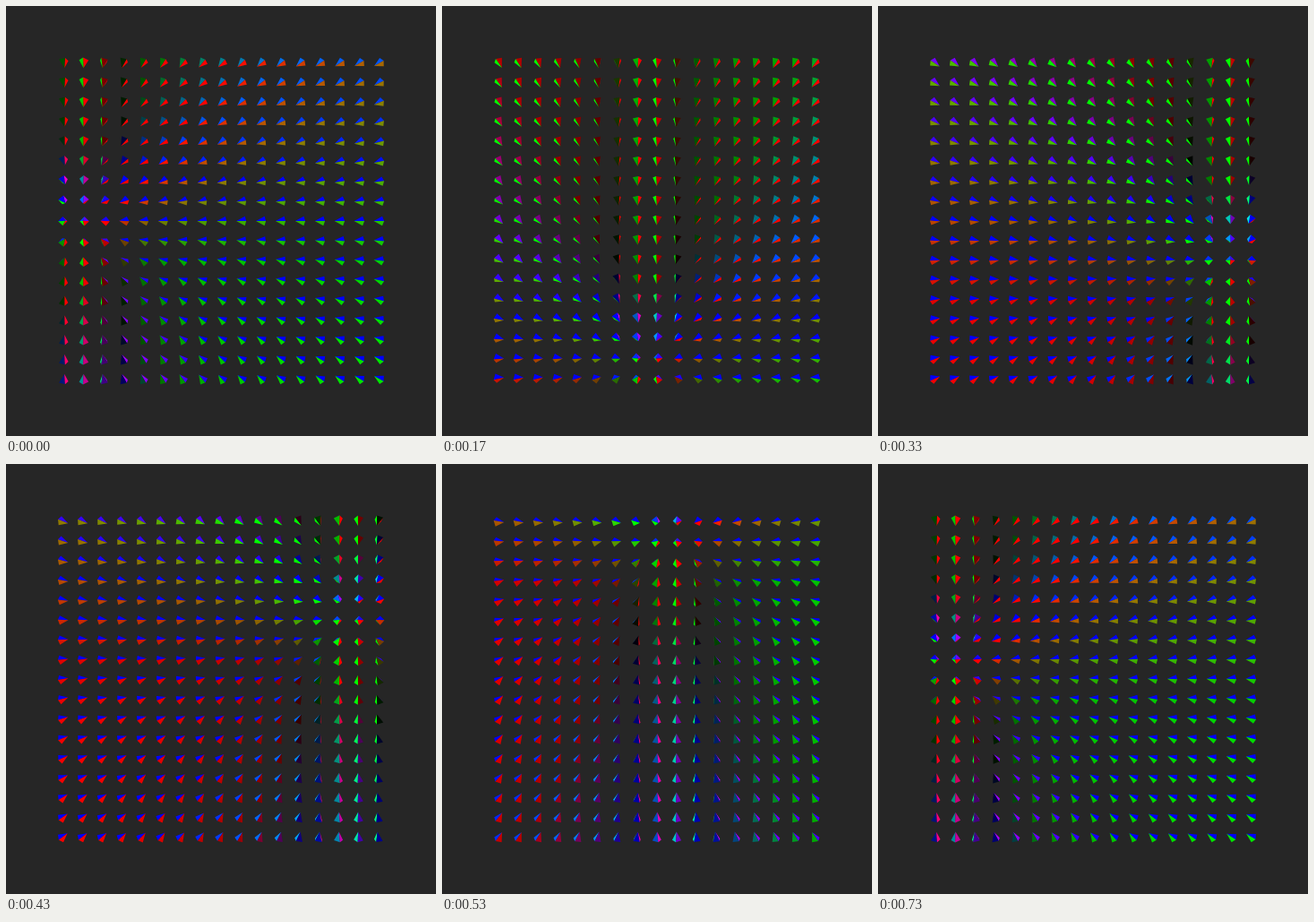
These frames come from a looping animation (480x480 px, 0.76 s). An HTML page with a canvas:

```html
<!DOCTYPE html>
<html>
<head>
<meta charset="utf-8">
<style>
html, body { margin: 0; width: 100%; height: 100%; overflow: hidden; background: #262626; }
canvas { display: block; }
</style>
</head>
<body>
<canvas id="stage" width="480" height="480"></canvas>
<script>
const ctx = document.getElementById('stage').getContext('2d');
const LOOP = 760, STEPS = 23;
const COUNT = 17, GAP = 21.9;
const RADIUS = 5.2, HALF = 5;
const CAMERA = 600;
const ORBIT = { radius: 150, y: 2, z: 40 };

// Orbit angle in degrees, counter-clockwise, by step.
const KEYS = [[0, 180], [5, 266], [10, 344], [13, 385], [16, 445], [19, 489], [22, 534]];

// Coloured lights in the picture plane: angle and strength for r, g, b.
const LIGHTS = [[-30, 1.45], [210, 1.35], [90, 3]].map(([deg, power]) => {
  const a = deg * Math.PI / 180;
  return [Math.cos(a) * power, Math.sin(a) * power, 0];
});

const add = (a, b, k = 1) => a.map((v, i) => v + b[i] * k);
const dot = (a, b) => a[0] * b[0] + a[1] * b[1] + a[2] * b[2];
const cross = (a, b) => [
  a[1] * b[2] - a[2] * b[1],
  a[2] * b[0] - a[0] * b[2],
  a[0] * b[1] - a[1] * b[0]
];
const unit = a => {
  const len = Math.hypot(...a) || 1;
  return a.map(v => v / len);
};

function project([x, y, z]) {
  const k = CAMERA / (CAMERA - z);
  return [240 + x * k, 240 - y * k];
}

function drawFace(points) {
  const normal = unit(cross(add(points[1], points[0], -1), add(points[2], points[0], -1)));
  if (dot(normal, add([0, 0, CAMERA], points[0], -1)) <= 0) return;
  const rgb = LIGHTS.map(light => Math.round(255 * Math.min(1, Math.max(0, dot(normal, light)))));
  ctx.fillStyle = `rgb(${rgb})`;
  ctx.beginPath();
  points.forEach(p => ctx.lineTo(...project(p)));
  ctx.fill();
}

function drawPyramid(center, target) {
  const ahead = unit(add(target, center, -1));
  const side = unit(cross([0, 1, 0], ahead));
  const up = cross(ahead, side);
  const tip = add(center, ahead, HALF);
  const back = add(center, ahead, -HALF);
  const base = [
    add(back, side, RADIUS), add(back, up, RADIUS),
    add(back, side, -RADIUS), add(back, up, -RADIUS)
  ];
  base.forEach((corner, i) => drawFace([tip, corner, base[(i + 1) % 4]]));
  drawFace([...base].reverse());
}

function orbitAngle(step) {
  const i = KEYS.findIndex(key => key[0] >= step);
  if (i === 0) return KEYS[0][1];
  const [s0, a0] = KEYS[i - 1], [s1, a1] = KEYS[i];
  return a0 + (a1 - a0) * (step - s0) / (s1 - s0);
}

function stepAt(time) {
  let step = 0;
  while (step < STEPS - 1 && Math.round((step + 1) * 10 / 3) * 10 <= time) step++;
  return step;
}

function render(now) {
  const angle = orbitAngle(stepAt(now % LOOP)) * Math.PI / 180;
  const target = [
    ORBIT.radius * Math.cos(angle),
    ORBIT.y + ORBIT.radius * Math.sin(angle),
    ORBIT.z
  ];
  ctx.fillStyle = '#262626';
  ctx.fillRect(0, 0, 480, 480);
  const mid = (COUNT - 1) / 2;
  for (let row = 0; row < COUNT; row++) {
    for (let col = 0; col < COUNT; col++) {
      drawPyramid([(col - mid) * GAP, (mid - row) * GAP, 0], target);
    }
  }
}

const start = performance.now();
function tick() {
  render(performance.now() - start);
  requestAnimationFrame(tick);
}
tick();
</script>
</body>
</html>
```
